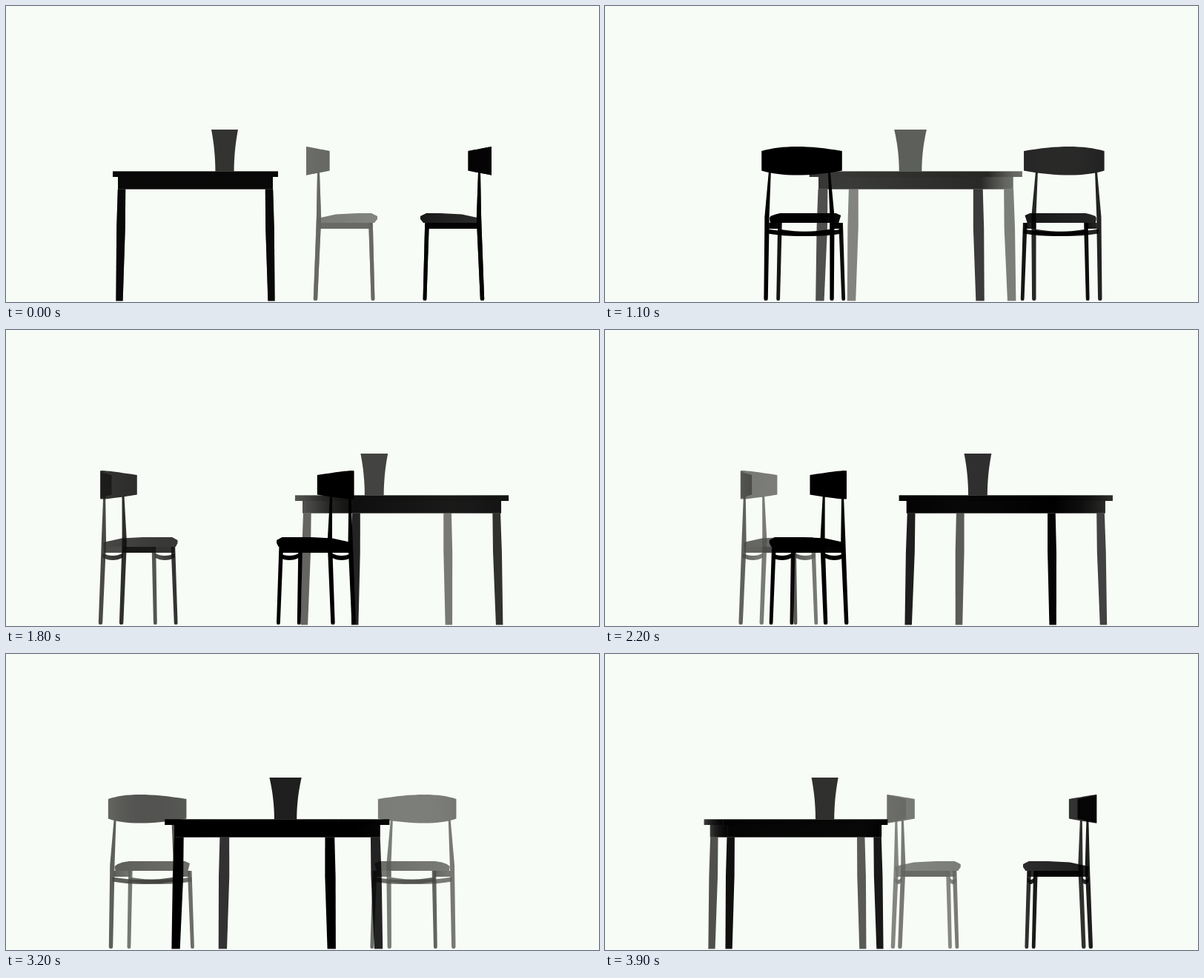
Recreate the animation shown at these times as an HTML page with a canvas. Size 800 by 400 pixels, loop 4 s.

```html
<!DOCTYPE html>
<html lang="en">
<head>
<meta charset="utf-8">
<title>Turning furniture</title>
<style>
html, body { margin: 0; width: 100%; height: 100%; overflow: hidden; background: #f8fcf6; }
canvas { display: block; }
</style>
</head>
<body>
<canvas id="stage" width="800" height="400"></canvas>
<script>
const ctx = document.getElementById('stage').getContext('2d');
const LOOP = 4000, STEP = 100;
const PAPER = 248, OPACITY = 0.86;
// [nearness, grey level of one layer on paper]
const FOG = [[-280, 133], [-180, 119], [-100, 92], [-70, 80], [-20, 58],
  [50, 41], [100, 31], [140, 18], [175, 0]];
let cos, sin, shapes;

function shade(near) {
  const n = Math.max(-280, Math.min(175, near));
  const i = Math.max(1, FOG.findIndex(p => p[0] >= n));
  const [n0, g0] = FOG[i - 1], [n1, g1] = FOG[i];
  const grey = g0 + (g1 - g0) * (n - n0) / (n1 - n0);
  const alpha = Math.max(OPACITY, 1 - grey / PAPER);
  const ink = Math.max(0, (grey - (1 - alpha) * PAPER) / alpha);
  return `rgba(${ink}, ${ink * 1.015}, ${ink * 0.97}, ${alpha})`;
}

const project = ([u, v]) => ({ x: 400 + u * cos + v * sin, near: u * sin - v * cos });

// Queue a polygon; stops give its nearness from side to side
function add(points, stops) {
  shapes.push({ points, stops, near: stops.reduce((sum, s) => sum + s.near, 0) / stops.length });
}

// Upright band through [a, b, top, bottom] items, one layer per screen direction
function ribbon(place, items) {
  const p = items.map(([a, b, top, bottom]) => ({ ...project(place(a, b)), top, bottom }));
  const heading = i => Math.sign(Math.round((p[i + 1].x - p[i].x) * 100));
  let start = 0;
  for (let i = 1; i < p.length; i++) {
    if (i < p.length - 1 && heading(i) === heading(start)) continue;
    const run = p.slice(start, i + 1);
    add([...run.map(q => [q.x, q.top]), ...run.slice().reverse().map(q => [q.x, q.bottom])], run);
    start = i;
  }
}

// Round pole through [a, b, y, radius] items
function pole(place, items, swell = 1) {
  const p = items.map(([a, b, y, r]) => ({ ...project(place(a, b)), y, r: r * swell }));
  add([...p.map(q => [q.x - q.r, q.y]), ...p.slice().reverse().map(q => [q.x + q.r, q.y])],
    [p[p.length >> 1]]);
}

function hull(points) {
  const sorted = points.slice().sort((p, q) => p[0] - q[0] || p[1] - q[1]);
  const half = list => {
    const out = [];
    for (const p of list) {
      while (out.length > 1) {
        const [a, b] = out.slice(-2);
        if ((b[0] - a[0]) * (p[1] - a[1]) - (b[1] - a[1]) * (p[0] - a[0]) > 0) break;
        out.pop();
      }
      out.push(p);
    }
    return out.slice(0, -1);
  };
  return [...half(sorted), ...half(sorted.reverse())];
}

// Evenly spaced values from -1 to 1
const span = n => Array.from({ length: n + 1 }, (_, i) => i * 2 / n - 1);

const CUSHION = [[20, 41, 287], [20, 40, 293], [45, 45, 284], [45, 38, 281.5], [75, 45, 283],
  [75, 38, 280], [93, 42, 283], [93, 35, 280], [101, 34, 284], [101, 34, 288], [97, 38, 293]];

function chair(place) {
  ribbon(place, span(16).map(k => [5 + 31.5 * k * k, 55.5 * k, 190 + 6 * k * k, 228.5 - 6 * k * k]));
  for (const f of [20, 94]) {
    ribbon(place, span(8).map(k => [f, 44 * k, 305 - 3.5 * k * k, 311 - 3.5 * k * k]));
  }
  for (const m of [-1, 1]) {
    ribbon(place, [[21, 42 * m, 293, 301], [94, 42 * m, 293, 301]]);
    pole(place, [[21.5, 41 * m, 225, 1.5], [22, 45 * m, 285, 3.1], [21.5, 45 * m, 300, 3.1],
      [17.5, 45.5 * m, 396, 2.7], [17.5, 45.5 * m, 398, 1.7]]);
    pole(place, [[92, 42 * m, 293, 2.8], [95, 45 * m, 396, 2.4], [95, 45 * m, 398, 1.6]]);
  }
  const seat = [-1, 1].flatMap(m => CUSHION.map(([f, s, y]) => ({ ...project(place(f, s * m)), y })));
  seat.sort((p, q) => p.x - q.x);
  add(hull(seat.map(p => [p.x, p.y])), [seat[0], seat[seat.length - 1]]);
}

function table(place) {
  const box = (a, b, top, bottom) => ribbon(place,
    [[-a, -b], [a, -b], [a, b], [-a, b], [-a, -b]].map(p => [...p, top, bottom]));
  box(111.5, 123, 223.5, 231);
  box(104.5, 112, 231, 247.5);
  const swell = Math.hypot(cos, 1.25 * sin);
  for (const m of [-1, 1]) for (const n of [-1, 1]) {
    pole(place, [[99.5 * m, 107 * n, 247.5, 5.2], [100.5 * m, 108 * n, 300, 5.8],
      [102.5 * m, 110.5 * n, 398.5, 4.6]], swell);
  }
}

function vase(u, v) {
  const p = project([u, v]), r = Math.hypot(18 * cos, 22 * sin);
  const edge = span(12).map(k => [r * (0.7 + 0.3 * ((1 - k) / 2) ** 2), 195.25 + 28.25 * k]);
  add([...edge.map(([w, y]) => [p.x - w, y]), ...edge.reverse().map(([w, y]) => [p.x + w, y])], [p]);
}

function fillFor(stops) {
  const first = stops[0], last = stops[stops.length - 1], width = last.x - first.x;
  if (Math.abs(width) < 1) return shade(first.near);
  const fill = ctx.createLinearGradient(first.x, 0, last.x, 0);
  stops.slice(1).forEach((b, i) => {
    const a = stops[i];
    for (let t = 0; t <= 1; t += 0.25) {
      const at = (a.x + (b.x - a.x) * t - first.x) / width;
      fill.addColorStop(Math.max(0, Math.min(1, at)), shade(a.near + (b.near - a.near) * t));
    }
  });
  return fill;
}

function paint({ points, stops }) {
  ctx.fillStyle = fillFor(stops);
  ctx.beginPath();
  points.forEach(p => ctx.lineTo(...p));
  ctx.fill();
}

function draw(time) {
  const tick = Math.floor((time % LOOP) / STEP + 0.001);
  const angle = Math.round(tick * 1.5) * Math.PI / 30;
  cos = Math.cos(angle);
  sin = Math.sin(angle);
  shapes = [];
  table((a, b) => [a - 144.5, b - 11]);
  vase(-105, -10);
  chair((f, s) => [f, 232 + s]);
  chair((f, s) => [260 - f, s - 90]);

  ctx.fillStyle = '#f8fcf6';
  ctx.fillRect(0, 0, 800, 400);
  shapes.sort((p, q) => p.near - q.near).forEach(paint);
  requestAnimationFrame(draw);
}
requestAnimationFrame(draw);
</script>
</body>
</html>
```
